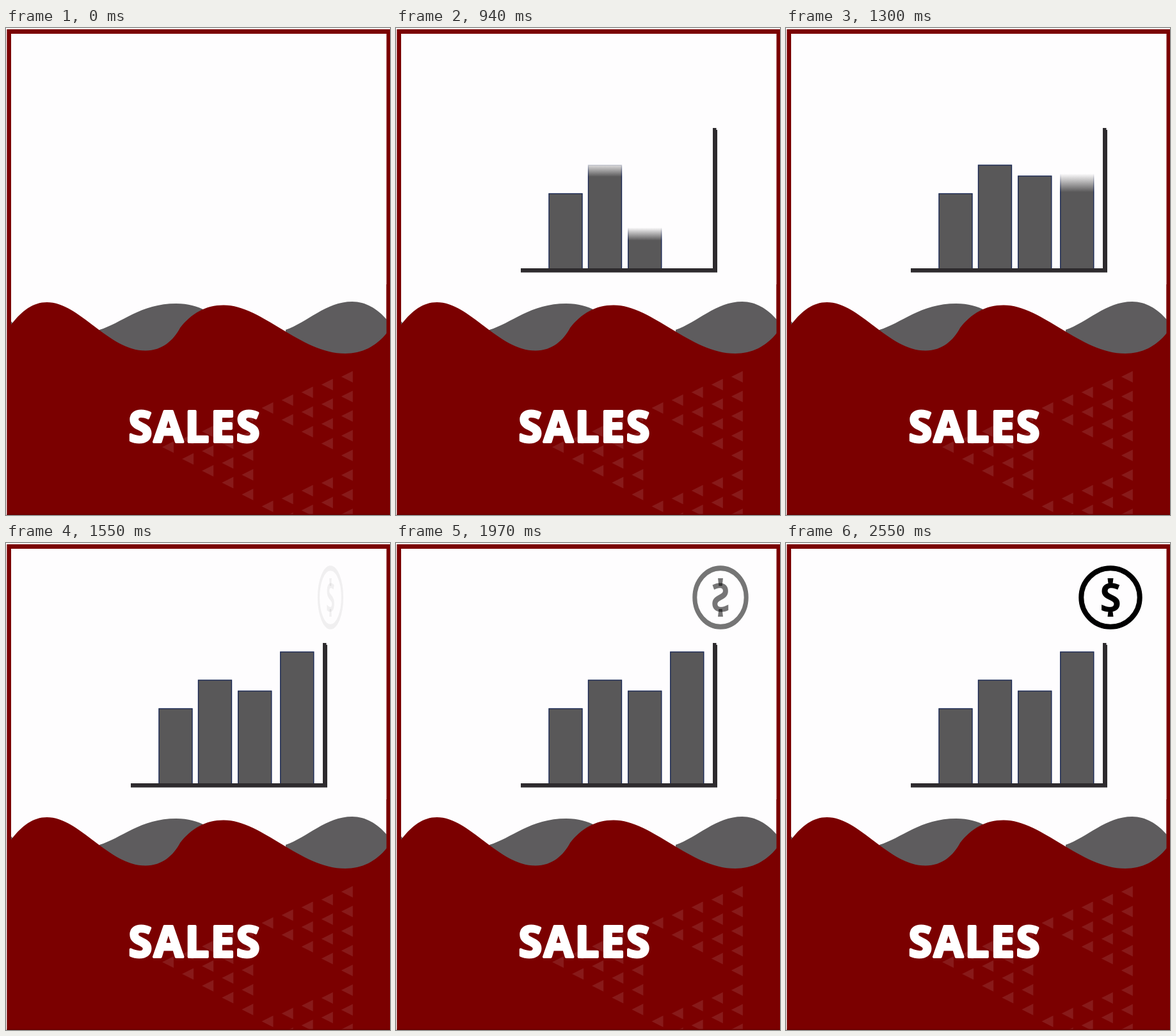
An HTML page with a canvas for the animation above (3420 ms loop, 600 px wide and 760 px high).

```html
<!DOCTYPE html>
<html lang="en">
<head>
<meta charset="utf-8">
<title>Sales</title>
<style>
  html, body { margin: 0; height: 100%; overflow: hidden; }
  canvas { display: block; }
</style>
</head>
<body>
<canvas id="stage" width="600" height="760"></canvas>
<script>
const ctx = document.getElementById('stage').getContext('2d');
const LOOP = 3420, CHART_AT = 640, BASE = 376, SOFT = 0.14;
const RED = '#7b0000', PAPER = '#fefdfe', GREY = '#5e5c5e', AXIS = '#2e2b2e';
const SANS = '"Noto Sans", "Open Sans", sans-serif';

const redWave = new Path2D(`M8 463 C25 441 42 428 64 428 C115 428 160 503.5 218 503.5
  C244 503.5 262 487 272 468 C290 445 312 432.5 340 432.5
  C400 432.5 460 508 530 508 C556 508 578 497 595 476 V760 H8 Z`);
const greyWaves = new Path2D(`M8 458 L14 464 H8 Z
  M146 471 C180 461 210 430 266 430 C285 430 298 434 312 441 V510 H146 Z
  M437 471 C470 460 500 427 541 427 C562 427 580 438 595 455 V510 H437 Z`);

const bars = [
  { x: 239, top: 258.5, start: 111, length: 588 },
  { x: 300.5, top: 214, start: 411, length: 588 },
  { x: 362.8, top: 231, start: 711, length: 588 },
  { x: 428.8, top: 170, start: 940, length: 570 },
];
const coin = { x: 507, y: 85, start: 1505, length: 868 };

const progress = (t, { start, length }) => Math.min(1, Math.max(0, (t - start) / length));

function rect(color, x, y, w, h) {
  ctx.fillStyle = color;
  ctx.fillRect(x, y, w, h);
}

function fillPath(color, path) {
  ctx.fillStyle = color;
  ctx.fill(path);
}

// Left-pointing triangle built of small ones, with an inverted hole
function drawTriangles() {
  ctx.fillStyle = 'rgba(255,255,255,.1)';
  for (let col = 0; col < 10; col++) {
    for (let row = 0; row <= col; row++) {
      if (col > 4 && row > col - 5 && row < 5) continue;
      const x = 244 + 31.1 * col, y = 654 - 12.2 * col + 30.7 * row;
      ctx.beginPath();
      ctx.moveTo(x, y);
      ctx.lineTo(x + 18, y - 9);
      ctx.lineTo(x + 18, y + 9);
      ctx.fill();
    }
  }
}

function drawTitle() {
  ctx.font = `bold 66px ${SANS}`;
  ctx.letterSpacing = '3px';
  ctx.textAlign = 'center';
  ctx.lineJoin = 'round';
  ctx.lineWidth = 4;
  ctx.fillStyle = ctx.strokeStyle = '#fff';
  ctx.fillText('SALES', 295.5, 646);
  ctx.strokeText('SALES', 295.5, 646);
  ctx.letterSpacing = '0px';
}

function drawScene() {
  rect('#fff', 0, 0, 600, 760);
  rect(RED, 1.3, 2, 598.7, 758);
  rect(PAPER, 8, 9, 586.5, 600);
  fillPath(GREY, greyWaves);
  fillPath(RED, redWave);
  rect(RED, 594.5, 400, 5.5, 360);
  drawTriangles();
  rect('#690000', 1.3, 758.5, 598.7, 1.5);
  drawTitle();
}

// Wipe from the bottom with a soft leading edge
function drawBar(bar, t) {
  const p = progress(t, bar);
  if (!p) return;
  const height = BASE - bar.top;
  const lead = BASE - height * p * (1 + SOFT);
  const fade = rgb => {
    const g = ctx.createLinearGradient(0, lead, 0, lead + height * SOFT);
    g.addColorStop(0, `rgba(${rgb},0)`);
    g.addColorStop(1, `rgba(${rgb},1)`);
    return g;
  };
  rect(fade('89,88,89'), bar.x, bar.top, 52, height);
  ctx.strokeStyle = fade('24,38,82');
  ctx.lineWidth = 1.4;
  ctx.lineJoin = 'miter';
  ctx.strokeRect(bar.x, bar.top, 52, height);
}

function drawAxes() {
  rect(AXIS, 195, 375, 307, 6.5);
  rect(AXIS, 495, 156, 5.5, 225);
  rect(AXIS, 497, 159, 5, 222);
}

// Fades in while swivelling two and a half half-turns
function drawCoin(t) {
  const p = progress(t, coin);
  if (!p) return;
  ctx.save();
  ctx.globalAlpha = p;
  ctx.translate(coin.x, coin.y);
  ctx.scale(Math.sin(2.5 * Math.PI * p), 1);
  ctx.fillStyle = ctx.strokeStyle = '#000';
  ctx.lineWidth = 8;
  ctx.beginPath();
  ctx.arc(0, 0, 45.7, 0, 2 * Math.PI);
  ctx.stroke();
  ctx.font = `bold 61px ${SANS}`;
  ctx.textAlign = 'center';
  ctx.fillText('S', 0, 21.5);
  fillPath('#000', new Path2D('M-4.5 -30 H4.5 L3 -18 H-3 Z M-3 18 H3 L4.5 30 H-4.5 Z'));
  ctx.restore();
}

function frame(now) {
  const t = now % LOOP;
  drawScene();
  if (t >= CHART_AT) {
    bars.forEach(bar => drawBar(bar, t));
    drawAxes();
    drawCoin(t);
  }
  requestAnimationFrame(frame);
}
requestAnimationFrame(frame);
</script>
</body>
</html>
```
